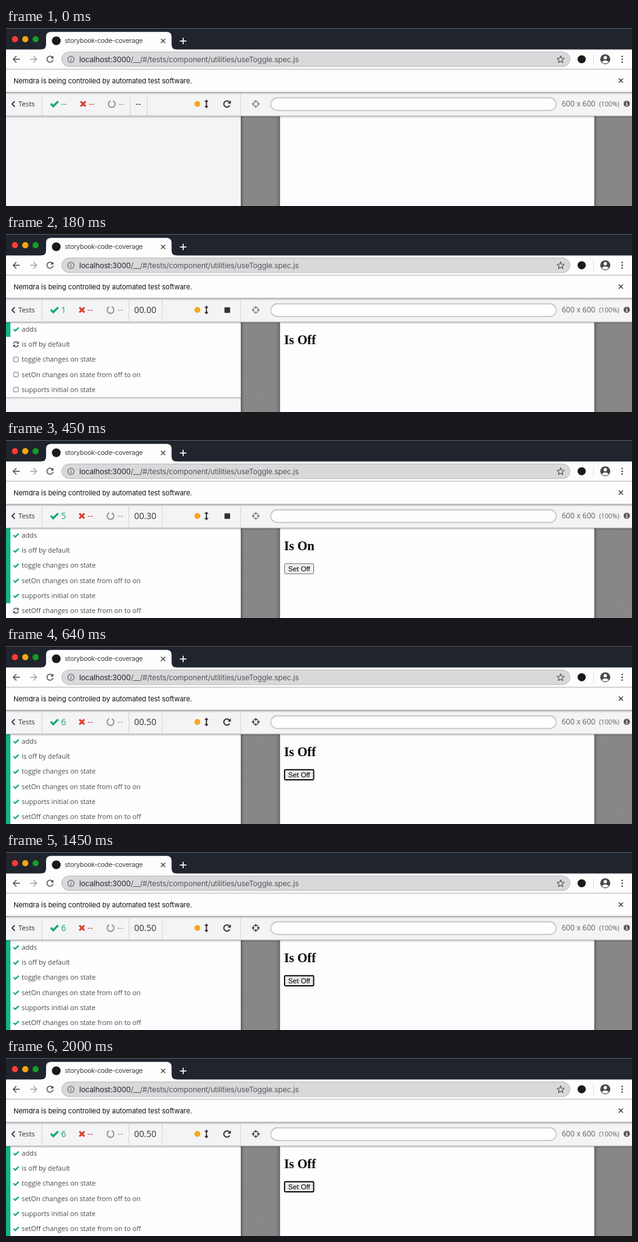
Recreate the animation shown at these times as an HTML page. Size 1000 px wide and 286 px high, loop 2.09 s.

```html
<!DOCTYPE html>
<html lang="en">
<head>
<meta charset="utf-8">
<title>Component test run</title>
<style>
  html, body { margin: 0; width: 100%; height: 100%; overflow: hidden; background: #fff; }
  svg { display: block; width: 100vw; height: 100vh; }
  text { white-space: pre; }
  .ui { font-family: Inter, Roboto, sans-serif; }
  .runner { font-family: "Open Sans", "Noto Sans", sans-serif; }
  .line { fill: none; stroke-linecap: round; stroke-linejoin: round; }
  .bare { fill: none; }
</style>
</head>
<body>
<svg viewBox="0 0 1000 286" preserveAspectRatio="none">
  <defs>
    <pattern id="hatch" width="4" height="4" patternUnits="userSpaceOnUse" patternTransform="rotate(45)">
      <rect width="4" height="4" fill="#8b8b8c"/>
      <rect width="1.5" height="4" fill="#818182"/>
    </pattern>
    <linearGradient id="down" x2="0" y2="1">
      <stop stop-color="#000" stop-opacity=".28"/>
      <stop offset="1" stop-color="#000" stop-opacity="0"/>
    </linearGradient>
    <linearGradient id="right">
      <stop stop-color="#000" stop-opacity=".3"/>
      <stop offset="1" stop-color="#000" stop-opacity="0"/>
    </linearGradient>
  </defs>

  <!-- Tab strip -->
  <rect width="1000" height="36" fill="#20242d"/>
  <rect width="1000" height="1" fill="#5a5d64"/>
  <circle cx="14.300" cy="18" r="4.900" fill="#fd3b2f"/>
  <circle cx="30.800" cy="18" r="4.900" fill="#fda50f"/>
  <circle cx="47.300" cy="18" r="4.900" fill="#13a022"/>
  <path d="M56 34.500q8 0 8-8V14.300q0-8 8-8H256.500q8 0 8 8V26.500q0 8 8 8V36H56z" fill="#fdfdfe"/>
  <circle cx="80.300" cy="20.500" r="7" fill="#1a1a1c"/>
  <text class="ui" x="94" y="24.300" font-size="10.400" letter-spacing="-.2" fill="#3b3d41">storybook-code-coverage</text>
  <path class="line" d="M248 17.800l6 6m0-6l-6 6" stroke="#45474b" stroke-width="1.400"/>
  <path class="line" d="M278.500 20.800h9m-4.500-4.500v9" stroke="#f2f2f4" stroke-width="1.700"/>

  <!-- Address bar -->
  <rect y="34.500" width="1000" height="32.500" fill="#fdfdfe"/>
  <g class="line" stroke="#4a4c50" stroke-width="1.400">
    <path d="M21.500 50.200H11.500m4.700-4.700l-4.700 4.700 4.700 4.700"/>
    <path d="M39 50.200h10m-4.700-4.700l4.700 4.700-4.700 4.700" stroke="#a2a3a6"/>
    <path d="M74.300 47.200a4.900 4.900 0 1 0 .8 4.300"/>
  </g>
  <path d="M75.600 44.500v4.500h-4.500z" fill="#4a4c50"/>
  <rect x="89" y="38.500" width="812" height="23.500" rx="11.700" fill="#d9d9db" stroke="#b9b9bc"/>
  <circle class="bare" cx="103.700" cy="50.300" r="5" stroke="#55575b" stroke-width="1.100"/>
  <path d="M103.700 49.700v3.300m0-5.700v1.200" stroke="#55575b" stroke-width="1.200"/>
  <text class="ui" x="117" y="54.500" font-size="12" letter-spacing="-.19" fill="#55575b"><tspan fill="#25272b">localhost:3000</tspan>/__/#/tests/component/utilities/useToggle.spec.js</text>
  <path class="line" d="M886 44.800l1.600 3.700 4 .4-3 2.700.9 4-3.500-2.100-3.500 2.100.9-4-3-2.700 4-.4z" stroke="#55575b" stroke-width="1.200"/>
  <circle cx="919.600" cy="50.200" r="6.500" fill="#1a1a1c"/>
  <path d="M938.500 42v17" stroke="#ddd"/>
  <circle cx="957.300" cy="50.200" r="8" fill="#46484d"/>
  <circle cx="957.300" cy="47.700" r="2.700" fill="#fdfdfe"/>
  <path d="M951.800 54.800q2-2.800 5.500-2.800t5.500 2.800q-2.200 2.300-5.500 2.300t-5.500-2.300z" fill="#fdfdfe"/>
  <g fill="#46484d">
    <circle cx="984.300" cy="45.700" r="1.300"/>
    <circle cx="984.300" cy="50.200" r="1.300"/>
    <circle cx="984.300" cy="54.700" r="1.300"/>
  </g>

  <!-- Notice bar -->
  <rect y="66" width="1000" height="38" fill="#fdfdfe"/>
  <rect y="65.700" width="1000" height="1" fill="#adadb0"/>
  <text class="ui" x="12" y="88.700" font-size="11" letter-spacing="-.06" fill="#101114">Nemdra is being controlled by automated test software.</text>
  <path class="line" d="M979.200 81.500l6 6m0-6l-6 6" stroke="#3c3e42" stroke-width="1.400"/>

  <!-- Runner panels -->
  <rect y="141" width="375" height="145" fill="#f4f4f6"/>
  <rect x="375" y="141" width="625" height="145" fill="url(#hatch)"/>
  <rect x="437.700" y="135" width="502" height="160" fill="#fefdff" style="filter: drop-shadow(0 0 3px rgba(0,0,0,.6))"/>
  <g id="page"></g>
  <g id="tests"></g>
  <rect x="375" y="141" width="5" height="145" fill="url(#right)"/>

  <!-- Runner header -->
  <rect y="141" width="1000" height="4" fill="url(#down)"/>
  <rect y="103" width="1000" height="38.500" fill="#f4f4f6"/>
  <rect y="103" width="1000" height="4" fill="url(#down)"/>
  <rect y="102.700" width="1000" height="1" fill="#a0a0a3"/>
  <rect y="140.800" width="1000" height="1" fill="#b0b0b2"/>
  <path class="line" d="M13.500 118.200l-4 4 4 4" stroke="#333" stroke-width="1.800"/>
  <text class="runner" x="19.700" y="126.200" font-size="11.300" fill="#333">Tests</text>
  <path d="M57.500 104v37M374.700 104v37" stroke="#d4d4d6"/>
  <g id="stats"></g>
  <circle cx="305.700" cy="122" r="4.700" fill="#faa51b"/>
  <path d="M320.200 117v10" stroke="#333" stroke-width="1.800"/>
  <path d="M316.800 118.800l3.400-3.800 3.400 3.800zm0 6.400l3.400 3.800 3.400-3.800z" fill="#333"/>
  <g id="control"></g>
  <g id="picker" class="bare">
    <circle cx="399" cy="122" r="4.400" stroke-width="1.300"/>
    <path d="M399 115.700v4.300m0 4v4.300M392.700 122h4.300m4 0h4.300" stroke-width="1.300"/>
  </g>
  <rect x="423" y="112" width="456" height="20.500" rx="10" fill="#fefdff" stroke="#bdbdbf" stroke-width="1.300"/>
  <path class="bare" d="M425.500 119q2-5.800 8-5.800h435q6 0 8 5.800" stroke="#e2e2e4"/>
  <g class="runner" fill="#626265">
    <text x="887.700" y="126.200" font-size="12">600 x 600</text>
    <text x="947.500" y="125.800" font-size="10.300">(100%)</text>
  </g>
  <circle cx="991.600" cy="121.700" r="5" fill="#555558"/>
  <path d="M990.300 120.800h1.500v3.700m-1.800 0h3.400M991.600 117.700v1.500" class="bare" stroke="#fff" stroke-width="1.200"/>
</svg>

<script>
const LOOP = 2090;
const ROW_HEIGHT = 24.25;
const GREEN = "#10a877";
const titles = [
  "adds",
  "is off by default",
  "toggle changes on state",
  "setOn changes on state from off to on",
  "supports initial on state",
  "setOff changes on state from on to off",
];

// Each state holds until the next one starts.
const states = [
  { at: 0, passed: 0, rows: 0, clock: "--" },
  { at: 90, passed: 0, rows: 5, clock: "00.00", running: true },
  { at: 180, passed: 1, rows: 5, clock: "00.00", running: true, heading: "Is Off" },
  { at: 270, passed: 2, rows: 6, clock: "00.10", running: true, heading: "Is Off", button: "Toggle" },
  { at: 360, passed: 3, rows: 6, clock: "00.20", running: true, heading: "Is Off", button: "Set On" },
  { at: 450, passed: 5, rows: 6, clock: "00.30", running: true, heading: "Is On", button: "Set Off" },
  { at: 550, passed: 5, rows: 6, clock: "00.40", running: true, heading: "Is Off", button: "Set Off", focused: true },
  { at: 640, passed: 6, rows: 6, clock: "00.50", heading: "Is Off", button: "Set Off", focused: true, done: true },
];

const byId = id => document.getElementById(id);

const text = (x, y, size, fill, content) =>
  `<text class="runner" x="${x}" y="${y}" font-size="${size}" fill="${fill}">${content}</text>`;

const stroke = (d, color, width) =>
  `<path class="bare" d="${d}" stroke="${color}" stroke-width="${width}"/>`;

function testIcon(y, index, state) {
  if (index < state.passed) return stroke(`M12 ${y}l2.800 2.800 5.400-5.400`, GREEN, 2.2);
  if (index > state.passed) {
    return `<rect class="bare" x="12.200" y="${y - 3.7}" width="7.400" height="7.400" rx=".8" stroke="#77777a"/>`;
  }
  return stroke(`M12 ${y - 1}a4.100 4.100 0 0 1 7.200-1.500M20 ${y + 1}a4.100 4.100 0 0 1-7.200 1.500`, "#555", 1.5) +
    `<path d="M20.500 ${y - 4.7}v4h-4zM11.500 ${y + 4.7}v-4h4z" fill="#555"/>`;
}

function testList(state) {
  if (!state.rows) return "";
  const bottom = 141 + ROW_HEIGHT * state.rows;
  const rows = titles.slice(0, state.rows).map((title, i) => {
    const y = 153 + ROW_HEIGHT * i;
    return testIcon(y, i, state) + text(25, y + 3.8, 10.75, "#4a4a4d", title);
  });
  return `<rect y="141" width="375" height="${bottom - 141}" fill="#fefdff"/>
    <rect y="${bottom}" width="375" height="3" fill="url(#down)"/>
    <rect y="141" width="7" height="${ROW_HEIGHT * state.passed}" fill="#0fb584"/>` + rows.join("");
}

function stats({ passed, clock }) {
  const shift = passed ? -2 : 0;
  const idle = clock === "--";
  const end = (idle ? 225.5 : 251.5) + shift;
  return stroke("M71.500 121.700l4 4 7.800-7.800", GREEN, 3.2) +
    text(88, 126.7, 14, GREEN, passed || "--") +
    `<g transform="translate(${shift})">` +
      stroke("M119.200 118l8 8m0-8l-8 8", "#d93a2b", 3) +
      text(132, 126.7, 14, "#d93a2b", "--") +
      stroke("M167 117a5.400 5.400 0 1 0 4 0", "#97979a", 2) +
      text(180, 126.7, 14, "#97979a", "--") +
      stroke("M198.500 104v37", "#d4d4d6", 1) +
      text(206.7, 126.7, 13.9, "#333", clock) +
    `</g>` +
    stroke(`M${end} 104v37`, "#d4d4d6", 1);
}

function control({ running }) {
  if (running) return `<rect x="349" y="117.700" width="9" height="9" rx=".8" fill="#333"/>`;
  return stroke("M357 119.500a4.900 4.900 0 1 0 .2 5", "#333", 1.9) +
    `<path d="M359.200 116.300v5.200h-5.200z" fill="#333"/>`;
}

function page({ heading = "", button, focused }) {
  const title = `<text x="444.300" y="176.700" font-size="20.500" font-weight="700"
    font-family="Liberation Serif, serif" fill="#000">${heading}</text>`;
  if (!button) return title;
  const frame = focused ? 'fill="#e9e9eb" stroke="#101010" stroke-width="1.900"' : 'fill="#efeff0" stroke="#707072"';
  return title + `<rect x="445" y="198.700" width="46.500" height="16.300" rx="1.500" ${frame}/>
    <text x="450.800" y="211" font-size="11.300" font-family="Liberation Sans, sans-serif" fill="#000">${button}</text>`;
}

let shown;
function draw(now) {
  const time = now % LOOP;
  const state = states.findLast(s => s.at <= time);
  if (state !== shown) {
    shown = state;
    byId("tests").innerHTML = testList(state);
    byId("stats").innerHTML = stats(state);
    byId("control").innerHTML = control(state);
    byId("page").innerHTML = page(state);
    byId("picker").setAttribute("stroke", state.done ? "#2c2c2e" : "#77777a");
  }
}

const start = performance.now();
function tick() {
  draw(performance.now() - start);
  requestAnimationFrame(tick);
}
tick();
</script>
</body>
</html>
```
